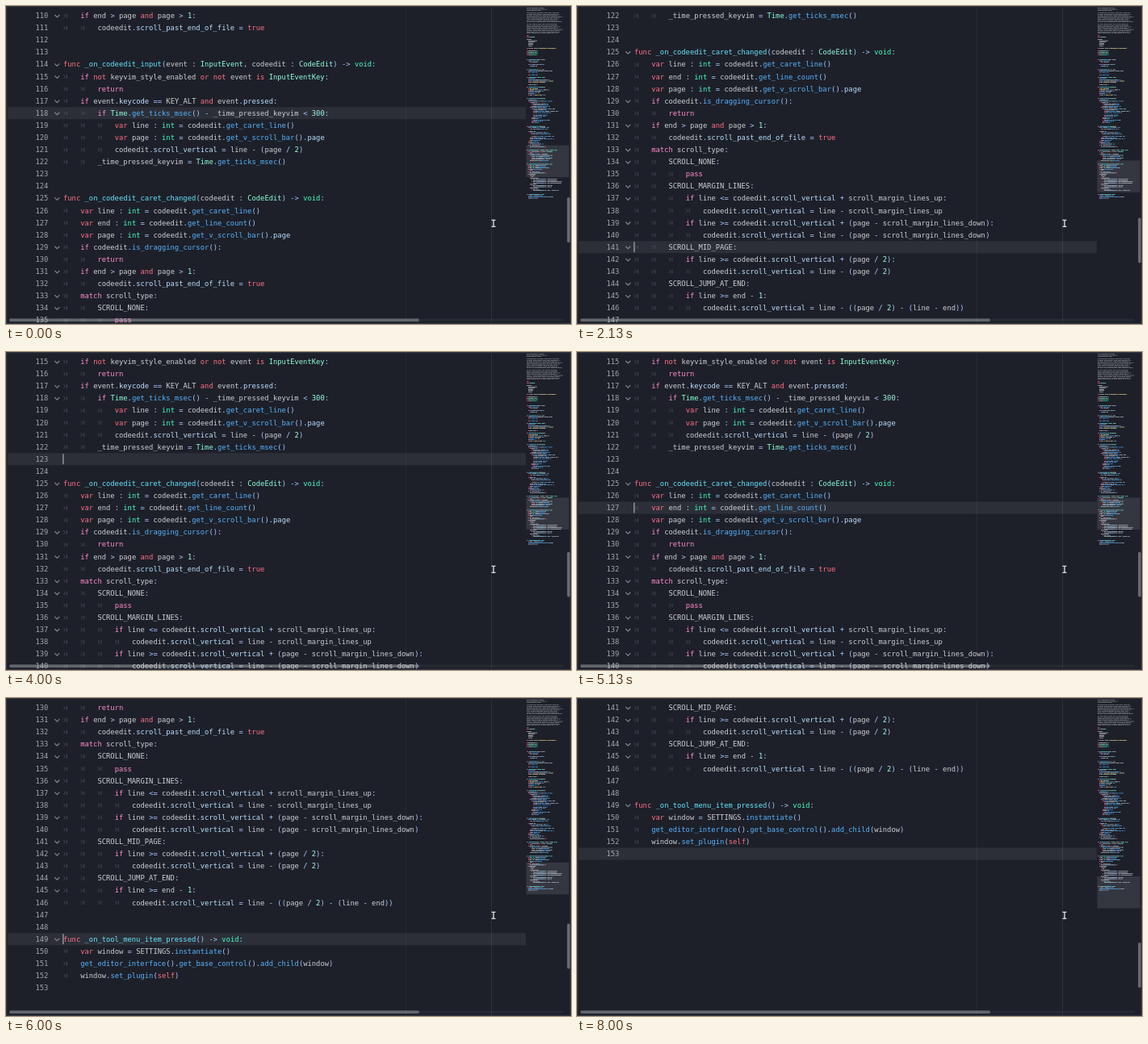
An HTML page with a canvas for the animation above (8.07 s loop, 700x394 px).

```html
<!DOCTYPE html>
<html lang="en">
<head>
<meta charset="utf-8">
<title>Code editor scrolling</title>
<style>
  html, body { margin: 0; width: 100%; height: 100%; overflow: hidden; background: #1d2029; }
  canvas { display: block; }
</style>
</head>
<body>
<canvas id="stage" width="700" height="394"></canvas>
<script>
const LOOP = 8070, FIRST = 110, LAST = 153;
const LEFT = 71, CHAR = 5.307, ROW = 15.09, TOP_Y = 12;
const MINI_X = 645, MINI_CHAR = 0.52, MINI_ROW = 1.56;

const COLOR = {
  text: '#cdcfd2', keyword: '#ff7085', flow: '#ff8ccc', base: '#42ffc2', engine: '#8fffdb',
  symbol: '#abc8ff', call: '#57b3ff', def: '#66e6ff', member: '#bce0ff', number: '#a1ffe0',
  string: '#ffeda1', comment: '#8b8e93'
};

// Each line starts with its indent level.
const code = `1if end > page and page > 1:
2codeedit.scroll_past_end_of_file = true
0
0
0func _on_codeedit_input(event : InputEvent, codeedit : CodeEdit) -> void:
1if not keyvim_style_enabled or not event is InputEventKey:
2return
1if event.keycode == KEY_ALT and event.pressed:
2if Time.get_ticks_msec() - _time_pressed_keyvim < 300:
3var line : int = codeedit.get_caret_line()
3var page : int = codeedit.get_v_scroll_bar().page
3codeedit.scroll_vertical = line - (page / 2)
2_time_pressed_keyvim = Time.get_ticks_msec()
0
0
0func _on_codeedit_caret_changed(codeedit : CodeEdit) -> void:
1var line : int = codeedit.get_caret_line()
1var end : int = codeedit.get_line_count()
1var page : int = codeedit.get_v_scroll_bar().page
1if codeedit.is_dragging_cursor():
2return
1if end > page and page > 1:
2codeedit.scroll_past_end_of_file = true
1match scroll_type:
2SCROLL_NONE:
3pass
2SCROLL_MARGIN_LINES:
3if line <= codeedit.scroll_vertical + scroll_margin_lines_up:
4codeedit.scroll_vertical = line - scroll_margin_lines_up
3if line >= codeedit.scroll_vertical + (page - scroll_margin_lines_down):
4codeedit.scroll_vertical = line - (page - scroll_margin_lines_down)
2SCROLL_MID_PAGE:
3if line >= codeedit.scroll_vertical + (page / 2):
4codeedit.scroll_vertical = line - (page / 2)
2SCROLL_JUMP_AT_END:
3if line >= end - 1:
4codeedit.scroll_vertical = line - ((page / 2) - (line - end))
0
0
0func _on_tool_menu_item_pressed() -> void:
1var window = SETTINGS.instantiate()
1get_editor_interface().get_base_control().add_child(window)
1window.set_plugin(self)
0`.split('\n').map(s => ({ indent: +s[0], tokens: tokenize(s.slice(1), s[0] * 4) }));

function tokenize(src, col) {
  return [...src.matchAll(/\w+|[^\w\s]+/g)].map(({ 0: word, index }) => {
    const before = src.slice(0, index), after = src[index + word.length];
    let kind = 'text';
    if (/^(func|var|and|or|not|is|true|self)$/.test(word)) kind = 'keyword';
    else if (/^(if|return|match|pass)$/.test(word)) kind = 'flow';
    else if (/^(int|void)$/.test(word)) kind = 'base';
    else if (/^(InputEvent|InputEventKey|CodeEdit|Time)$/.test(word)) kind = 'engine';
    else if (/^\d/.test(word)) kind = 'number';
    else if (/^\W/.test(word)) kind = 'symbol';
    else if (before.endsWith('func ')) kind = 'def';
    else if (after === '(') kind = 'call';
    else if (before.endsWith('.')) kind = 'member';
    return { word, col: col + index, color: COLOR[kind] };
  });
}

// Caret moves: [time, line, first visible line]
const moves = [[-1000, 118, 110]];
function press(start, step, count) {
  for (let i = 0; i < count; i++) {
    let [, line, top] = moves[moves.length - 1];
    line += step;
    top = Math.max(Math.min(top, line - 8), line - 19);
    if (line === LAST) top = line - 12;
    moves.push([start + (i ? 200 + 40 * i : 0), line, top]);
  }
}
press(670, 1, 1);
press(1070, 1, 25);
press(2350, -1, 4);
press(3070, -1, 17);
press(4440, 1, 1);
press(4835, 1, 28);
press(6530, 1, 1);

const ctx = document.getElementById('stage').getContext('2d');
const minimap = drawMinimap();

function drawMinimap() {
  const scale = 4, map = document.createElement('canvas');
  map.width = 55 * scale;
  map.height = 250 * scale;
  const g = map.getContext('2d');
  g.scale(scale, scale);
  g.globalAlpha = 0.6;
  let seed = 7;
  const rand = n => (seed = seed * 16807 % 2147483647) % n;
  const bar = (n, col, len, kind) => {
    g.fillStyle = COLOR[kind] || kind;
    g.fillRect(col * MINI_CHAR, 2 + (n - 1) * MINI_ROW, len * MINI_CHAR, 1.05);
  };
  const words = (n, col, end, kinds) => {
    while (col < end) {
      const len = Math.min(2 + rand(9), end - col);
      bar(n, col, len, kinds[rand(kinds.length)]);
      col += len + 1;
    }
  };
  const comment = (from, to, width) => {
    for (let n = from; n <= to; n++) words(n, 0, width - rand(14), ['comment']);
  };
  // The indent wanders by one level per line; the odd line is blank.
  const func = (from, to, kinds, depth) => {
    bar(from, 0, 4, 'keyword');
    bar(from, 5, 18, 'def');
    words(from, 24, 44, ['text', 'engine']);
    let indent = 1;
    for (let n = from + 1; n <= to; n++) {
      const col = 4 * indent;
      bar(n, col, 3, rand(2) ? 'flow' : 'keyword');
      words(n, col + 4, col + 16 + rand(46), kinds);
      indent = Math.max(1, Math.min(depth, indent + rand(3) - 1));
      if (!rand(7)) n++;
    }
  };
  comment(1, 3, 48);
  comment(5, 12, 86);
  comment(14, 21, 86);
  bar(23, 0, 5, 'keyword');
  bar(24, 0, 7, 'keyword');
  bar(24, 8, 12, 'engine');
  for (let n = 26; n < 32; n++) bar(n, n === 26 ? 0 : 4, 10 + rand(12), 'text');
  bar(33, 0, 5, 'keyword');
  words(33, 6, 30, ['text']);
  words(33, 31, 70, ['string']);
  for (let n = 35; n < 39; n++) {
    bar(n, 0, 3, 'keyword');
    words(n, 4, 26, ['text', 'base']);
  }
  const plain = ['text', 'call', 'member', 'call'], strings = ['call', 'string', 'text', 'call'];
  func(42, 47, plain, 2);
  func(50, 54, plain, 2);
  func(56, 62, strings, 1);
  func(64, 70, strings, 1);
  func(73, 92, plain, 4);
  func(95, 109, plain, 3);
  code.forEach((line, i) => line.tokens.forEach(t => bar(FIRST + i, t.col, t.word.length, t.color)));
  return map;
}

function box(x, y, w, h, color) {
  ctx.fillStyle = color;
  ctx.fillRect(x, y, w, h);
}

function pill(x, y, w, h, color) {
  ctx.fillStyle = color;
  ctx.beginPath();
  ctx.roundRect(x, y, w, h, Math.min(w, h) / 2);
  ctx.fill();
}

function stroke(color, width, ...points) {
  ctx.strokeStyle = color;
  ctx.lineWidth = width;
  ctx.beginPath();
  points.forEach(([x, y], i) => i ? ctx.lineTo(x, y) : ctx.moveTo(x, y));
  ctx.stroke();
}

function drawLine(n, y) {
  const line = code[n - FIRST], next = code[n - FIRST + 1];
  ctx.fillStyle = '#a3a6ab';
  ctx.fillText(n, 36.4, y + 3.1);
  if (next && next.indent > line.indent)
    stroke('#80848a', 1.2, [60.3, y - 1], [63.3, y + 2], [66.3, y - 1]);
  for (let i = 0; i < line.indent; i++) {
    const x = LEFT + i * 4 * CHAR;
    stroke('#4a4d57', 0.9, [x + 0.5, y - 2], [x + 2.6, y + 0.2], [x + 0.5, y + 2.4]);
    stroke('#4a4d57', 0.9, [x + 4.5, y - 2.2], [x + 4.5, y + 2.6]);
  }
  for (const t of line.tokens) {
    ctx.fillStyle = t.color;
    ctx.fillText(t.word, LEFT + t.col * CHAR, y + 3.1);
  }
}

function draw(t) {
  const [time, caret, top] = moves.findLast(m => m[0] <= t);
  const rowY = n => TOP_Y + (n - top) * ROW;

  box(0, 0, 700, 394, '#1d2029');
  box(2, rowY(caret) - 7.5, 642, 15, '#2c2f38');
  box(495, 2, 1, 391, 'rgba(205,207,210,.06)');
  box(601, 2, 1, 391, 'rgba(205,207,210,.1)');

  ctx.font = `${CHAR / 0.602}px "DejaVu Sans Mono", "Noto Sans Mono", monospace`;
  for (let n = top; n <= Math.min(top + 25, LAST); n++) drawLine(n, rowY(n));
  if (t - time < 650) box(70.4, rowY(caret) - 6.5, 1, 13, '#c4c6c9');

  box(MINI_X - 0.5, 2.6 + (top - 1) * MINI_ROW, 53, 39.5, 'rgba(255,255,255,.1)');
  ctx.drawImage(minimap, MINI_X, 0, 55, 250);

  pill(4, 387.6, 687, 3, 'rgba(205,207,210,.06)');
  pill(4, 387.2, 508, 3.8, 'rgba(205,207,210,.36)');
  pill(695.2, 237 + (top - FIRST) * 2.13, 3.6, 56, '#6a6d75');

  // Mouse pointer
  const x = 604, y = 269.3;
  stroke('#e8e8e8', 1.3, [x, y - 4], [x, y + 4]);
  for (const end of [y - 4, y + 4]) stroke('#e8e8e8', 1.2, [x - 2.5, end], [x + 2.5, end]);

  ctx.strokeStyle = '#343844';
  ctx.lineWidth = 1.4;
  ctx.strokeRect(0.5, 0.5, 699, 393);
}

function frame() {
  draw(performance.now() % LOOP);
  requestAnimationFrame(frame);
}
frame();
</script>
</body>
</html>
```
